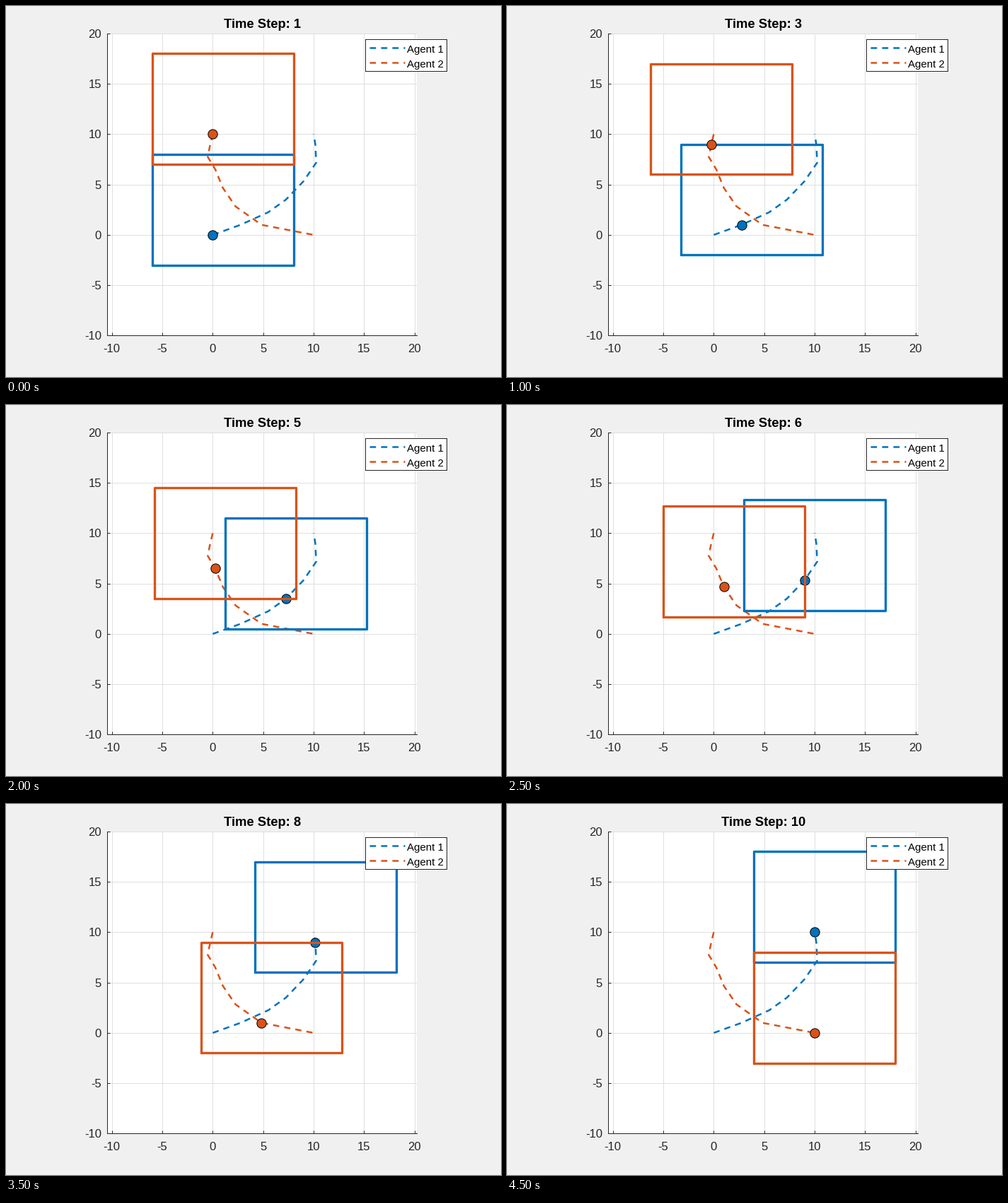
A matplotlib script that plays this animation: 700x525 px, repeating every 5 s.

```python
import matplotlib.pyplot as plt
from matplotlib.animation import FuncAnimation

W, H, DPI = 700, 525, 100
BLUE, ORANGE, DARK = "#0072bd", "#d95319", "#262626"
DASHES = (3.5, 2.88)

# Agent positions at each time step
X1 = [0, 0, 2.75, 5.5, 7.25, 9, 10.25, 10.167, 10.083, 10]
X2 = [0, 0, -0.25, -0.5, 0.25, 1, 2.25, 4.833, 7.417, 10]
Y1 = [0, 0, 1, 2.25, 3.5, 5.333, 7.167, 9, 9.5, 10]
Y2 = [10 - y for y in Y1]


def px(n):
    """Pixels to points."""
    return n * 72 / DPI


def rect(left, top, right, bottom):
    """Pixel edges, counted from the top left, to figure fractions."""
    return [left / W, 1 - bottom / H, (right - left) / W, (bottom - top) / H]


plt.rcParams.update({
    "font.family": "Liberation Sans",
    "axes.unicode_minus": False,
    "toolbar": "None",
})

fig = plt.figure(figsize=(W / DPI, H / DPI), dpi=DPI, facecolor="#f0f0f0")
ax = fig.add_axes(rect(142.6, 38.85, 581.3, 466.45))
ax.set(xlim=(-10.5, 20.25), ylim=(-10, 20),
       xticks=range(-10, 21, 5), yticks=range(-10, 21, 5))
ax.set_axisbelow(True)
ax.grid(color="#dfdfdf", lw=px(1))
ax.tick_params(direction="in", length=px(4.4), width=px(1), color=DARK,
               labelcolor=DARK, labelsize=px(16.67))
ax.tick_params(axis="x", pad=px(11.5))
ax.tick_params(axis="y", pad=px(7.5))
for side in ("top", "right"):
    ax.spines[side].set_visible(False)
for side in ("left", "bottom"):
    ax.spines[side].set(color=DARK, linewidth=px(1))

title = fig.text(362.5 / W, 1 - 31 / H, "", ha="center", va="baseline",
                 size=px(18.33), weight="bold")


class Agent:
    def __init__(self, xs, ys, color, z):
        self.xs, self.ys = xs, ys
        ax.plot(xs, ys, color=color, lw=px(2.5), dashes=DASHES, zorder=2)
        self.box, = ax.plot([], [], color=color, lw=px(3.33), zorder=z,
                            solid_joinstyle="round", solid_capstyle="round")
        self.dot, = ax.plot([], [], "o", ms=px(13.33), mfc=color, mec="black",
                            mew=px(1), zorder=z + 1)

    def move(self, i):
        x, y = self.xs[i], self.ys[i]
        l, r, b, t = x - 6, x + 8, y - 3, y + 8
        self.box.set_data([l, r, r, l, l], [b, b, t, t, b])
        self.dot.set_data([x], [y])


agents = [Agent(X1, Y1, BLUE, 3), Agent(X2, Y2, ORANGE, 5)]

# Legend, laid out in pixels
key = fig.add_axes(rect(508, 47, 623, 92), zorder=5)
key.set(xlim=(508, 623), ylim=(92, 47), xticks=[], yticks=[])
for spine in key.spines.values():
    spine.set(color=DARK, linewidth=px(1))
for name, color, y in (("Agent 1", BLUE, 59.5), ("Agent 2", ORANGE, 80)):
    key.plot([513.5, 563.5], [y, y], color=color, lw=px(2.5), dashes=DASHES)
    key.text(567, y + 6.5, name, size=px(15), va="baseline")


def draw(i):
    title.set_text(f"Time Step: {i + 1}")
    for agent in agents:
        agent.move(i)


anim = FuncAnimation(fig, draw, frames=10, interval=500, init_func=lambda: draw(0),
                     repeat=True, repeat_delay=0, blit=False)
plt.show()
```
